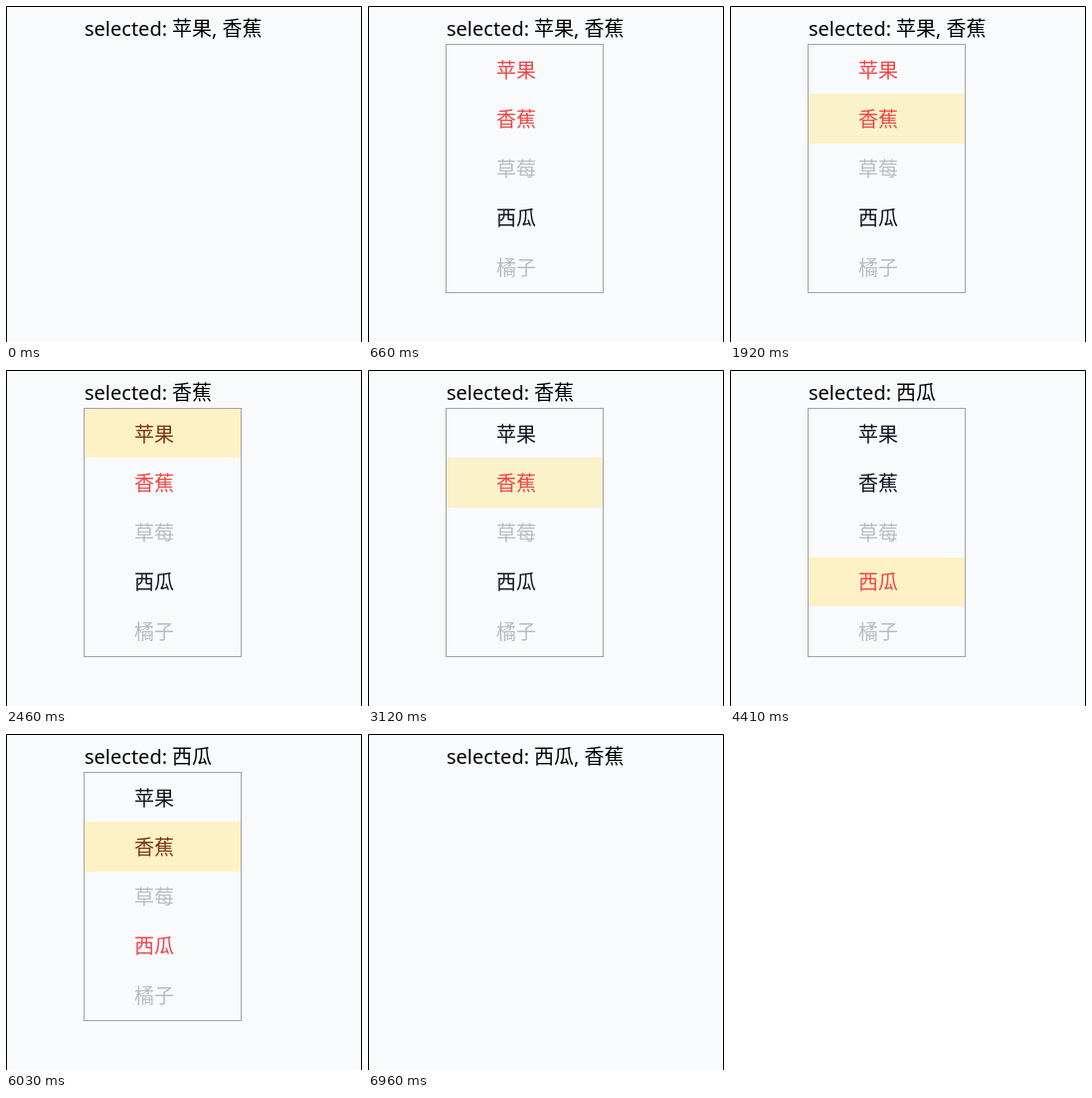
An HTML page for the animation above (7680 ms loop, 358 by 337 pixels).

```html
<!DOCTYPE html>
<html lang="zh-CN">
<head>
<meta charset="utf-8">
<title>Multi select</title>
<style>
  html, body { margin: 0; width: 100%; height: 100%; overflow: hidden; background: #f9fafc; }
  svg { display: block; width: 358px; height: 337px; }
  text { font: 20px "Noto Sans", "Noto Sans CJK SC", "Noto Sans CJK", sans-serif; white-space: pre; }
</style>
</head>
<body>
<svg id="stage" viewBox="0 0 358 337">
  <rect width="358" height="337" fill="#f9fafc"/>
  <path d="M.5 337V.5H357.5V337" fill="none" stroke="#000"/>
  <text x="79" y="30">selected:</text>
  <text id="value" x="167" y="30"></text>
  <g id="menu">
    <rect id="hover" x="79" width="157"/>
    <rect x="78.5" y="38.5" width="158" height="249" fill="none" stroke="#a0a3a9"/>
  </g>
</svg>
<script>
const LOOP = 7680;
const NONE = -1;
const items = ['苹果', '香蕉', '草莓', '西瓜', '橘子'];
const disabled = [2, 4];
const rowTops = [39, 88, 138, 188, 237, 287];

// Each track lists [start time, value]; a value holds until the next entry.
const openTrack = [[0, false], [660, true], [5250, false], [5850, true], [6960, false]];
const selectedTrack = [[0, [0, 1]], [2460, [1]], [3450, []], [4410, [3]], [6330, [3, 1]], [6960, [3, 1]]];
const hoverTrack = [
  [0, NONE], [1380, 0], [1440, 1], [1530, 3], [1650, NONE], [1770, 3], [1860, NONE],
  [1920, 1], [2070, 0], [3120, 1], [3810, NONE], [3990, 3], [4650, NONE],
  [5940, 0], [6030, 1], [6510, NONE]
];

const $ = id => document.getElementById(id);
const menu = $('menu'), hoverBox = $('hover'), value = $('value');

const labels = items.map((name, i) => {
  const label = document.createElementNS('http://www.w3.org/2000/svg', 'text');
  label.setAttribute('x', 129);
  label.setAttribute('y', Math.round(71.5 + i * 49.5));
  label.textContent = name;
  return menu.appendChild(label);
});

function at(track, t) {
  let current = track[0][1];
  for (const [start, v] of track) if (t >= start) current = v;
  return current;
}

function labelColor(i, hovered, selected) {
  if (disabled.includes(i)) return '#b9bbc0';
  if (selected.includes(i)) return '#ef4444';
  return i === hovered ? '#78350f' : '#0b1220';
}

function render(t) {
  const selected = at(selectedTrack, t);
  const hovered = at(hoverTrack, t);

  value.textContent = selected.map(i => items[i]).join(', ');
  menu.style.display = at(openTrack, t) ? '' : 'none';

  hoverBox.style.display = hovered === NONE ? 'none' : '';
  if (hovered !== NONE) {
    hoverBox.setAttribute('y', rowTops[hovered]);
    hoverBox.setAttribute('height', rowTops[hovered + 1] - rowTops[hovered]);
    hoverBox.setAttribute('fill', hovered === 1 && t < 3810 ? '#faf2c8' : '#fef1c6');
  }
  labels.forEach((label, i) => label.setAttribute('fill', labelColor(i, hovered, selected)));
}

const began = performance.now();
function tick() {
  render((performance.now() - began) % LOOP);
  requestAnimationFrame(tick);
}
tick();
</script>
</body>
</html>
```
